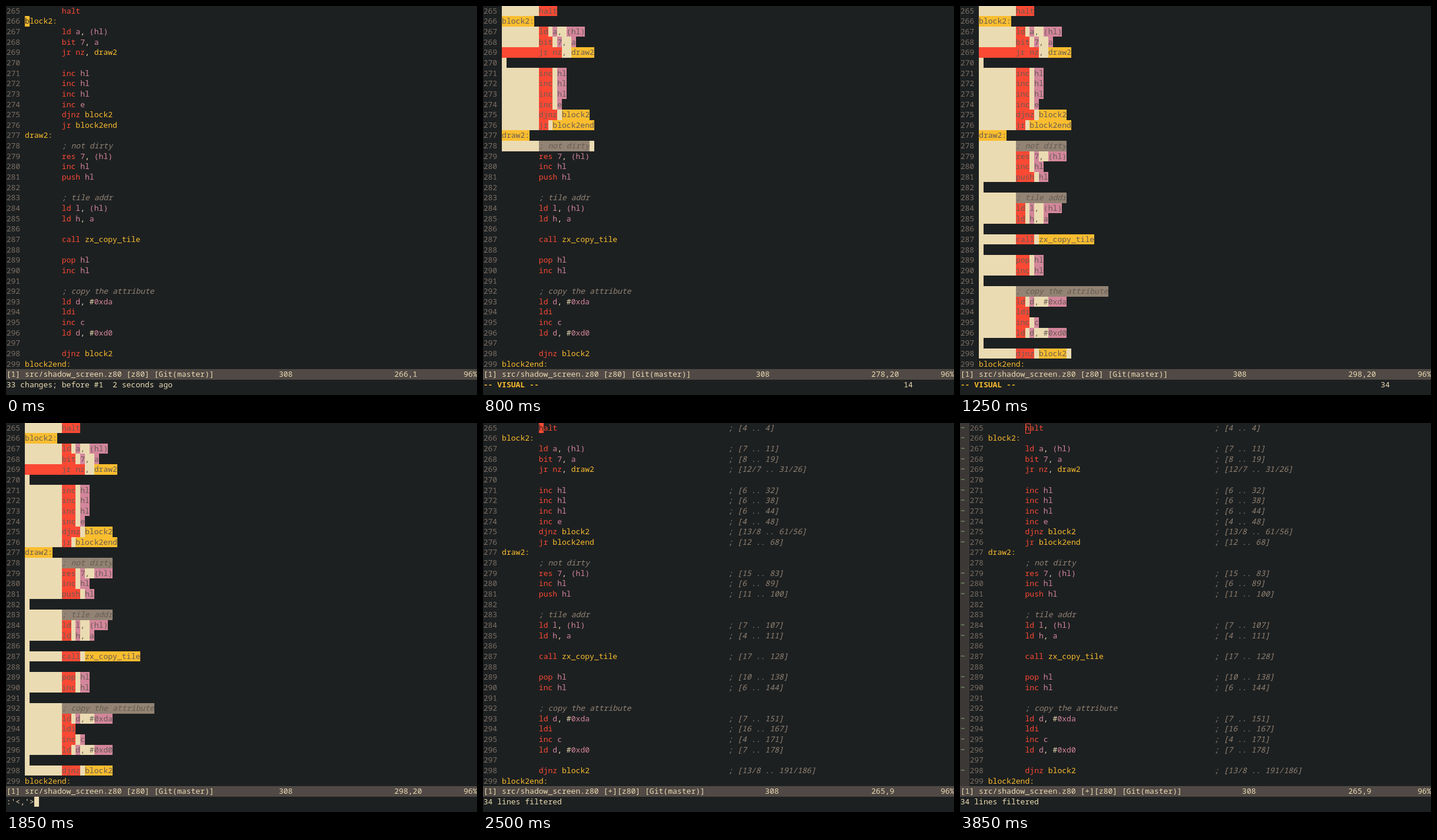
These frames come from a looping animation (800 by 661 pixels, 4.7 s). An HTML page with a canvas:

```html
<!DOCTYPE html>
<html lang="en">
<head>
<meta charset="utf-8">
<title>Editor filter</title>
<style>
  html, body { margin: 0; width: 100%; height: 100%; overflow: hidden; background: #1d2021; }
  canvas { display: block; }
</style>
</head>
<body>
<canvas id="stage" width="800" height="661"></canvas>
<script>
const ctx = document.getElementById('stage').getContext('2d');
const LOOP = 4700, FIRST = 265, ROWS = 35;
const CELL = 7.843, LINE = 17.647, LEFT = 0.7, TOP = -0.5, BASE = 12.7;
const COMMENT_COL = 49;
const C = {
  bg: '#1d2021', fg: '#ebdbb2', red: '#fb4934', yellow: '#fabd2f', purple: '#d3869b',
  gray: '#928374', number: '#7c6f64', bar: '#504945', gutter: '#3c3836', sign: '#8ec07c',
  selected: '#665c54'
};

// Each instruction is followed by its cycle count(s).
const program = `halt|4
block2:
ld a, (hl)|7
bit 7, a|8
jr nz, draw2|12/7

inc hl|6
inc hl|6
inc hl|6
inc e|4
djnz block2|13/8
jr block2end|12
draw2:
; not dirty
res 7, (hl)|15
inc hl|6
push hl|11

; tile addr
ld l, (hl)|7
ld h, a|4

call zx_copy_tile|17

pop hl|10
inc hl|6

; copy the attribute
ld d, #0xda|7
ldi|16
inc c|4
ld d, #0xd0|7

djnz block2|13/8
block2end:`;

let total = 0;
const lines = program.split('\n').map((source, row) => {
  const [code, cycles] = source.split('|');
  const text = !code || code.endsWith(':') ? code : ' '.repeat(8) + code;
  let note = '';
  if (cycles) {
    const sums = cycles.split('/').map(n => total + Number(n));
    total = sums[sums.length - 1];
    note = `; [${cycles} .. ${sums.join('/')}]`;
  }
  return { text, note, tokens: tokenize(text), changed: row < 12 || note !== '' };
});

function tokenize(text) {
  const parts = text.matchAll(/^ +jr nz|;.*|\(hl\)|\w+:?|[^\w;(]+/g);
  return [...parts].map(m => ({ text: m[0], col: m.index, color: colorOf(m[0]) }));
}

function colorOf(word) {
  if (word[0] === ';') return C.gray;
  if (/^(block2|draw2|zx_)/.test(word)) return C.yellow;
  if (/jr nz$|^(halt|ldi?|bit|jr|inc|djnz|res|push|call|pop)$/.test(word)) return C.red;
  return /^[\w(]/.test(word) ? C.purple : C.fg;
}

const xAt = col => LEFT + col * CELL;
const yAt = row => TOP + row * LINE;

function fillCells(col, row, count, color) {
  const x = Math.round(xAt(col)), y = Math.round(yAt(row));
  ctx.fillStyle = color;
  ctx.fillRect(x, y, Math.round(xAt(col + count)) - x, Math.round(yAt(row + 1)) - y);
}

function write(text, col, row, color, style = '') {
  ctx.font = `${style} 13.07px "Noto Sans Mono", monospace`;
  ctx.fillStyle = color;
  ctx.fillText(text, xAt(col), BASE + row * LINE);
}

function drawLine(row, left, state) {
  const { text, note, tokens, changed } = lines[row];
  const selected = row <= state.last;
  if (state.signs && changed) write('~', 0, row, C.sign);
  write(FIRST + row, left - 4, row, C.number);
  if (selected && !text) fillCells(left, row, 1, C.fg);
  for (const token of tokens) {
    const col = left + token.col;
    if (selected) fillCells(col, row, token.text.length, token.color);
    write(token.text, col, row, selected ? C.selected : token.color,
      token.color === C.gray ? 'italic' : '');
  }
  if (state.filtered && note) write(note, left + COMMENT_COL, row, C.gray, 'italic');
}

function drawCursor({ col, row, color, char = '', hollow }) {
  if (hollow) {
    ctx.strokeStyle = color;
    ctx.lineWidth = 1;
    ctx.strokeRect(Math.round(xAt(col)) + 0.5, Math.round(yAt(row)) + 1.5, 8, 16);
    return;
  }
  fillCells(col, row, 1, color);
  write(char, col, row, C.bg);
}

function drawStatus({ pos, filtered }) {
  const y = Math.round(yAt(ROWS));
  ctx.fillStyle = C.bar;
  ctx.fillRect(0, y, 800, Math.round(yAt(ROWS + 1)) - y);
  const flags = filtered ? '[+][z80]' : '[z80]';
  write(`[1] src/shadow_screen.z80 ${flags} [Git(master)]`, 0, ROWS, C.fg);
  write('308', filtered ? 61 : 59, ROWS, C.fg);
  write(pos, 84, ROWS, C.fg);
  write('96%', 99, ROWS, C.fg);
}

function visualState(t) {
  const last = t < 950
    ? Math.round((t - 650) / 300 * 25)
    : Math.round(25 + Math.min(1, (t - 950) / 300) * 8);
  const end = lines[last].text.length;
  return {
    last, pos: `${FIRST + last},${end + 1}`,
    message: '-- VISUAL --', count: last + 1,
    cursor: { col: 4 + end, row: last, color: C.fg }
  };
}

function stateAt(time) {
  const t = Math.floor(time / 50) * 50;
  const undo = '33 changes; before #1  2 seconds ago';
  if (t < 600) {
    return { pos: '266,1', message: undo, cursor: { col: 4, row: 1, color: C.yellow, char: 'b' } };
  }
  if (t < 650) {
    return { pos: '265,1', message: undo, cursor: { col: 4, row: 0, color: C.fg } };
  }
  if (t < 1850) return visualState(t);
  const range = ":'<,'>";
  if (t < 2400) {
    const message = range + (t < 2000 ? '' : t < 2050 ? '!' : '!z');
    return {
      last: 33, pos: '298,20', message,
      cursor: { col: message.length, row: 36, color: C.fg }
    };
  }
  if (t < 2500) {
    return { last: t < 2450 ? 33 : -1, pos: '265,1', message: range + '!z80count -s' };
  }
  const signs = t >= 2750;
  return {
    filtered: true, signs, pos: '265,9', message: '34 lines filtered',
    cursor: { col: signs ? 14 : 12, row: 0, color: C.red, char: 'h', hollow: t >= 3850 }
  };
}

function draw(time) {
  const state = stateAt(time);
  const left = state.signs ? 6 : 4;
  ctx.fillStyle = C.bg;
  ctx.fillRect(0, 0, 800, 661);
  if (state.signs) {
    ctx.fillStyle = C.gutter;
    ctx.fillRect(0, 0, 16, Math.round(yAt(ROWS)));
  }
  for (let row = 0; row < ROWS; row++) drawLine(row, left, state);
  drawStatus(state);
  const visual = state.count !== undefined;
  write(state.message, 0, 36, visual ? C.yellow : C.fg, visual ? 'bold' : '');
  if (visual) write(state.count, 91, 36, C.fg);
  if (state.cursor) drawCursor(state.cursor);
}

const start = performance.now();
function tick() {
  draw((performance.now() - start) % LOOP);
  requestAnimationFrame(tick);
}
tick();
</script>
</body>
</html>
```
